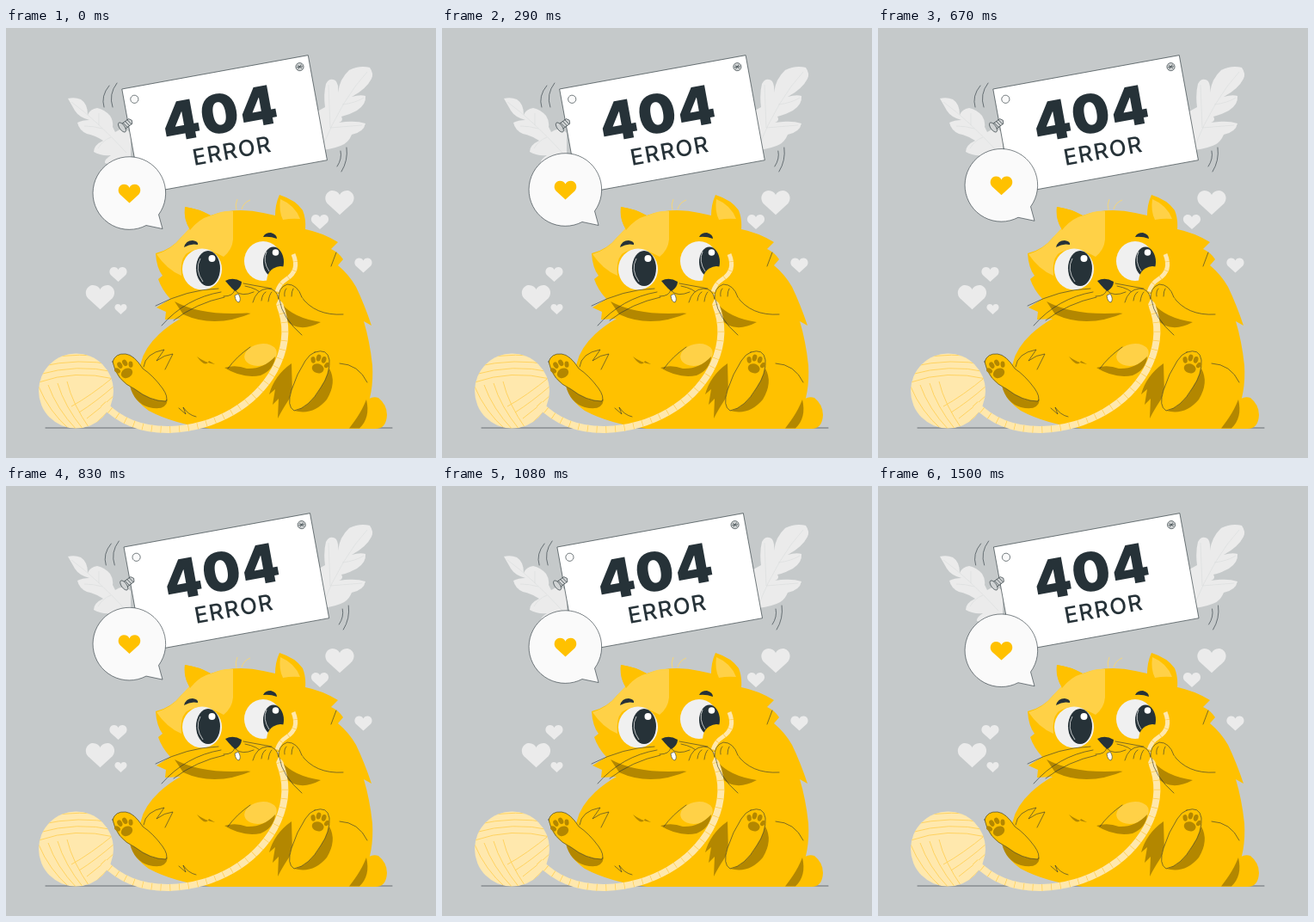
Recreate the animation shown at these times as an HTML page. Size 500x500 px, loop 1540 ms.

```html
<!DOCTYPE html>
<html lang="en">
<head>
<meta charset="utf-8">
<title>404 error</title>
<style>
  html, body { margin: 0; width: 100%; height: 100%; overflow: hidden; background: #c5c9ca; }
  svg { display: block; width: 100%; height: 100%; }
  text { font-family: Inter, sans-serif; text-anchor: middle; fill: #263238; }
  .line { fill: none; stroke: #263238; stroke-width: .6; stroke-linecap: round; stroke-linejoin: round; }
  .edge { stroke: #263238; stroke-width: .6; stroke-linejoin: round; }
  .cat { fill: #ffc100; }
  .light { fill: #ffd147; }
  .shade { fill: #b38700; }
  .ink { fill: #263238; }
  .pale { fill: #ebebeb; }
  .vein { fill: none; stroke: #dcdede; stroke-width: .7; }
  .thread { fill: none; stroke: #ffe8ad; stroke-width: 8; }
  .ticks { fill: none; stroke: #ffcd4d; stroke-width: 8; stroke-dasharray: .7 10; }
</style>
</head>
<body>
<svg viewBox="0 0 500 500">
  <defs>
    <path id="heart" d="M0 8.6L-8.6.8C-12-3.5-9-8.5-5-8.5C-2.6-8.5-.8-7.2 0-5.4C.8-7.2 2.6-8.5 5-8.5C9-8.5 12-3.5 8.6.8Z"/>
    <path id="yarn" d="M113 437C130 455 155 467.500 190 467C245 465 290 437 312 398C326 372 327 350 321 330Q317 320 317 309"/>
    <path id="yarnEnd" d="M315 307Q318 297 326 292Q342 282 334 263"/>
    <clipPath id="ballClip"><circle cx="81.500" cy="422" r="43.500"/></clipPath>
    <g id="pads" class="shade">
      <ellipse cx="0" cy="5" rx="7" ry="5.500"/>
      <ellipse cx="-8" cy="-3" rx="2.600" ry="3.800" transform="rotate(-25 -8 -3)"/>
      <ellipse cx="-2.500" cy="-7" rx="2.700" ry="4"/>
      <ellipse cx="4" cy="-6.500" rx="2.700" ry="4"/>
      <ellipse cx="9" cy="-1.500" rx="2.500" ry="3.600" transform="rotate(25 9 -1.500)"/>
    </g>
  </defs>

  <!-- leaves -->
  <path class="pale" d="M72 82Q80 80 87 83Q95 88 95 101Q98 94 106 93Q115 95 121 102Q125 108 124 115L127 121Q137 114 145 122V150L126 160L115 157Q114 153 122 148Q110 149 102 144Q102 136 113 131Q104 125 94 123Q85 119 83 110Q89 107 97 107Q85 104 80 96Z"/>
  <path class="vein" d="M76 86Q105 107 140 145M108 113V99M112 117Q102 114 91 114M122 127Q112 131 107 140"/>
  <path class="pale" d="M362 146L362 97L371 92Q369 77 372 65Q376 57 383 61Q387 65 386 75Q388 59 399 49Q411 43 423 46Q428 53 425 59Q419 71 402 80Q412 77 418 79Q419 89 408 96Q399 101 390 103Q393 108 387 110Q406 107 418 111Q416 121 402 124Q398 134 389 137Q376 142 362 142Z"/>
  <path class="vein" d="M420 51Q391 82 367 140M391 89Q407 87 416 81M377 116L414 113M377 116L375 66"/>

  <g class="pale">
    <use href="#heart" transform="translate(388 203) scale(1.650)"/>
    <use href="#heart" transform="translate(365 225.500)"/>
    <use href="#heart" transform="translate(415.500 276)"/>
    <use href="#heart" transform="translate(130.500 286.500)"/>
    <use href="#heart" transform="translate(109.500 313) scale(1.650)"/>
    <use href="#heart" transform="translate(133.500 327) scale(.7)"/>
  </g>

  <!-- sign -->
  <g id="sign">
    <path class="line" d="M129 64Q119 77 124 92M120 67Q110 79 114 92M396 139Q398 154 390 167M389 143Q391 152 385 161"/>
    <g transform="translate(134.800 71) rotate(-10.300)">
      <rect class="edge" width="220" height="124" fill="#fff"/>
      <circle class="edge" cx="12.200" cy="14.200" r="4.600" fill="#fafafa"/>
      <g transform="translate(208 11.500)">
        <circle class="edge" r="4.600" fill="#d0d3d4"/>
        <path class="line" d="M-2-2L2 2M2-2L-2 2M-3 0H3"/>
      </g>
      <text x="107" y="70.800" font-size="62.500" font-weight="900" letter-spacing="1.500">404</text>
      <text x="113.300" y="102.700" font-size="26" font-weight="500" letter-spacing="1.400">ERROR</text>
    </g>
    <g class="edge" fill="#d0d3d4" transform="translate(135 115.500) rotate(-36)">
      <path d="M0-3.500H12L14 0L12 3.500H0Z"/>
      <path class="line" d="M4-3.500L5 3.500M7-3.500L8 3.500M10-3.500L11 3.500"/>
      <ellipse rx="3" ry="6.500"/>
    </g>
  </g>

  <!-- speech bubble -->
  <g id="bubble">
    <path class="edge" fill="#fafafa" stroke-width=".8" d="M163 229.500A42.300 42.300 0 1 1 177.500 217L182 233.500Z"/>
    <use class="cat" href="#heart" transform="translate(143.500 192.500) scale(1.270)"/>
  </g>

  <path class="line" d="M46 465H449"/>

  <!-- cat -->
  <path class="cat" d="M405 466L416 436Q424 427 433 430Q443 438 443 450Q442 466 430 466Z"/>
  <path class="cat" d="M208 208Q224 210 238 218Q268 208 299 215L313 218Q313 205 318 194Q337 200 345 212Q349 222 348 234Q368 238 386 249L378 257Q387 261 392 269L386 276Q399 287 407 301Q417 322 425 346L416 341Q423 364 426 392Q428 425 416 450L405 466H238Q194 460 166 445Q148 432 146 419L157 389Q161 372 178 356Q190 345 203 338L185 339L186 330L175 325L191 315Q181 304 177 292L182 288Q175 279 174 262Q192 258 204 243L214 234Q206 223 208 208Z"/>
  <path class="shade" d="M419 432C413 448 403 460 399 465.500H411Q424 453 419 432Z"/>
  <path class="light" d="M213 233Q225 218 239 218Q252 212 264 213V246Q263 258 253 266Q226 250 209 263Q202 271 204 288Q187 281 175 263Q192 258 204 243Z"/>
  <path class="cat" d="M208 208Q223 210 238 218Q224 222 214 235Q207 223 208 208Z"/>
  <path class="light" d="M319 199Q336 206 342 222Q332 221 322 223Q317 213 319 199Z"/>
  <path fill="none" stroke="#ffd966" stroke-width=".8" d="M268 212Q266 205 269 199M274 211Q276 203 284 200"/>

  <!-- face -->
  <path class="shade" d="M196 318Q230 336 287 331Q243 350 206 333Z"/>
  <ellipse cx="228" cy="280.500" rx="23" ry="24" fill="#f0f0f0"/>
  <ellipse class="ink" cx="235" cy="279.500" rx="14" ry="20.500"/>
  <circle cx="239.500" cy="268" r="4" fill="#fff"/>
  <ellipse cx="299" cy="271" rx="22" ry="23" fill="#f0f0f0"/>
  <ellipse class="ink" cx="311" cy="272" rx="12" ry="17.500"/>
  <circle cx="313.500" cy="261" r="3.800" fill="#fff"/>
  <path fill="none" stroke="#fff" stroke-width=".7" d="M226 268Q219 281 229 295M303 260Q298 271 306 283"/>
  <path class="ink" d="M207 255Q209 247 217 247Q224 248 223 252Q215 250 207 255ZM299 243Q301 238 308 238Q315 240 315 245Q307 242 299 243Z"/>
  <path class="ink" d="M255 294Q264 289 274 295Q274 301 267 306Q264 305 255 294Z"/>
  <path class="edge" fill="#fff" d="M266 311L270 309Q274 315 271 319Q267 319 266 311Z"/>
  <path class="line" d="M266 304Q265 312 253 312M267 306Q274 313 288 307M247 303Q211 304 174 323M250 307Q209 314 181 346M254 313Q221 320 195 340M276 297L309 303M278 300Q293 303 298 310"/>

  <!-- arms and belly -->
  <path class="shade" d="M321 321Q334 337 366 342Q340 356 323 338Z"/>
  <ellipse class="light" cx="296" cy="380" rx="19" ry="12.500" transform="rotate(-12 296 380)"/>
  <path class="shade" d="M254 395Q267 391 280 396Q299 397 313 382Q312 397 296 404Q275 408 254 395ZM222 382Q231 389 243 391L236 387Q232 396 222 382Z"/>
  <path class="line" d="M343 312Q359 335 392 333M388 390Q410 391 420 412M284 371Q268 382 258 396M384 261L378 277M160 394Q162 378 184 374L175 387Q184 380 194 379L185 397M201 442L209 449L206 441Q212 450 221 452"/>

  <!-- right foot -->
  <path class="shade" d="M332 390Q312 404 306 426L313 420L310 438L317 431L316 454Q322 442 333 426Z"/>
  <path class="shade" d="M376 396Q385 412 373 432Q357 451 335 445Q360 428 376 396Z"/>
  <path class="cat" id="rightSole" d="M359 377Q374 372 376 386Q377 402 366 418Q352 442 335 445Q326 440 332 421Q338 402 348 387Q353 379 359 377Z"/>
  <ellipse class="light" cx="347" cy="424" rx="7" ry="14" transform="rotate(32 347 424)"/>
  <use class="line" href="#rightSole" style="fill:none"/>
  <use href="#pads" transform="translate(364 391) rotate(16)"/>

  <!-- left foot -->
  <path class="shade" d="M144 416Q149 436 166 441Q186 446 188 432Z"/>
  <path class="cat" id="leftSole" d="M124 388Q127 378 139 379Q149 380 159 396Q171 404 182 419Q189 429 186 434Q168 434 150 420Q128 410 124 388Z"/>
  <ellipse class="light" cx="161" cy="412" rx="15" ry="8" transform="rotate(37 161 412)"/>
  <use class="line" href="#leftSole" style="fill:none"/>
  <use href="#pads" transform="translate(138 397) rotate(-30)"/>

  <!-- yarn and paws -->
  <circle cx="81.500" cy="422" r="43.500" fill="#ffe8ad"/>
  <path id="strands" clip-path="url(#ballClip)" fill="none" stroke="#ffcd4d" stroke-width=".8"/>
  <use class="thread" href="#yarn"/>
  <use class="ticks" href="#yarn"/>
  <path class="cat" d="M303 299Q302 279 319 277Q335 278 335 288L323 306Z"/>
  <use class="thread" href="#yarnEnd" style="stroke-width:5"/>
  <use class="ticks" href="#yarnEnd" style="stroke-width:5"/>
  <path class="cat" d="M287 319Q291 304 304 303Q315 303 317 315Q312 329 299 335L280 331Z"/>
  <path class="cat" d="M317 315Q316 302 327 298Q339 298 344 313L355 338L331 329Z"/>
  <path class="line" d="M287 319Q291 304 304 303Q315 303 317 315M297 317Q298 309 302 307M305 318Q306 310 309 307M317 315Q316 302 327 298Q339 298 344 313M324 312Q323 306 326 303M332 312Q332 306 334 303M318 316Q321 337 344 357"/>
</svg>
<script>
  const PERIOD = 1440, LOOP = 1540, STEP = LOOP / 37;
  const shake = [0, -1, 2, -4, 4, -4, 4, -4, 2, -1, 0];
  const sign = document.getElementById('sign');
  const bubble = document.getElementById('bubble');

  // Strands wound around the ball in three directions
  let strands = '';
  for (let i = 0; i < 4; i++) {
    strands += `M38 ${412 - i * 9}Q${80 + i * 3} ${397 - i * 7} 126 ${408 - i * 8}`;
    strands += `M${76 + i * 9} ${440 + i * 7}Q${98 + i * 6} ${428 + i * 7} 126 ${405 + i * 11}`;
    strands += `M${38 + i * 11} ${417 - i * 2}Q${50 + i * 9} ${446 - i * 3} ${74 + i * 8} 467`;
  }
  document.getElementById('strands').setAttribute('d', strands);

  function draw(now) {
    const time = Math.floor((now % LOOP + 5) / STEP) * STEP;
    const phase = time % PERIOD / PERIOD;
    const key = Math.floor(phase * 10);
    const x = shake[key] + (shake[key + 1] - shake[key]) * (phase * 10 - key);
    const y = -10 * (1 - Math.abs(1 - 2 * phase));
    sign.setAttribute('transform', `translate(${x} 0)`);
    bubble.setAttribute('transform', `translate(0 ${y})`);
    requestAnimationFrame(draw);
  }
  draw(performance.now());
</script>
</body>
</html>
```
